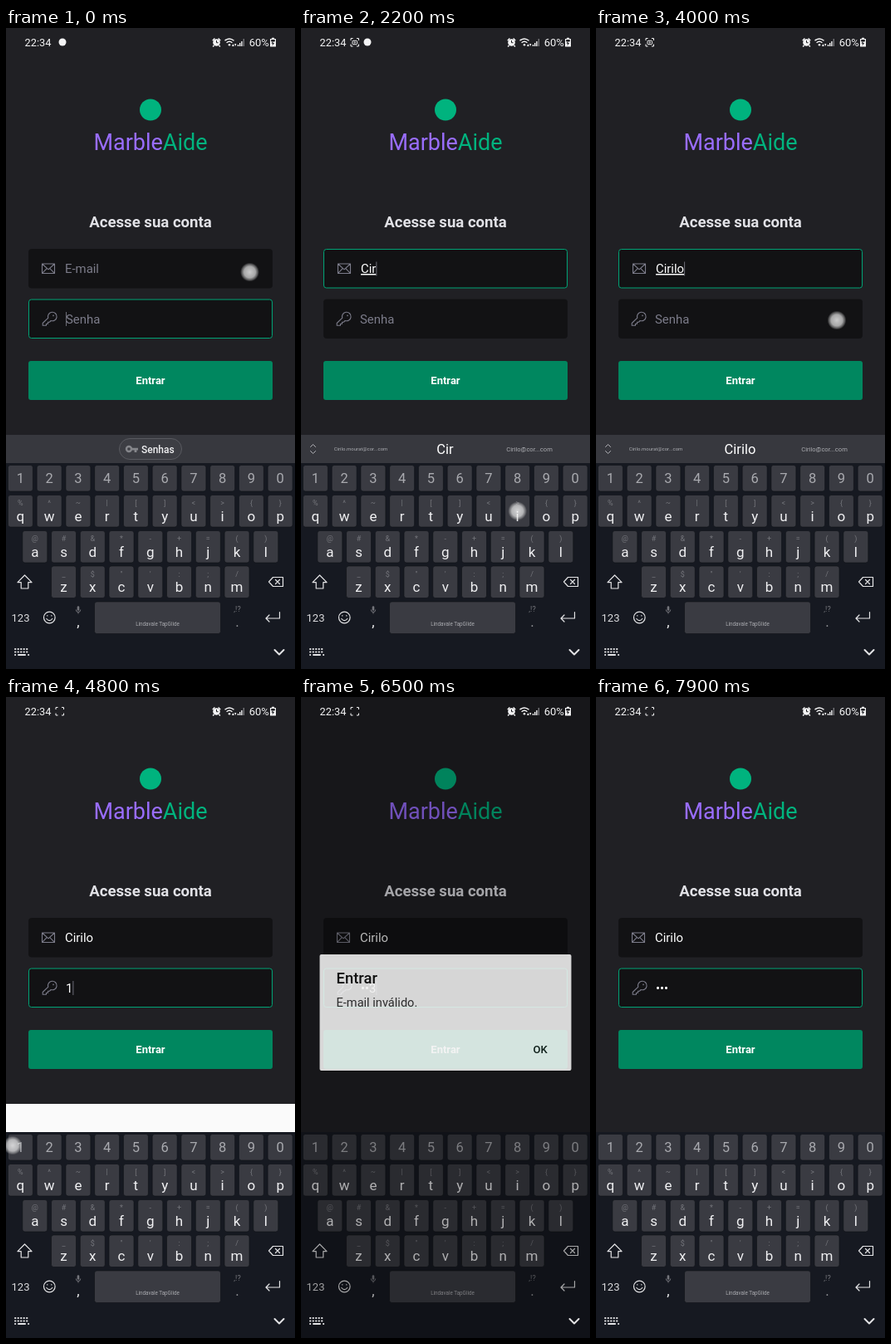
An HTML page for the animation above (8000 ms loop, 348 by 772 pixels).

```html
<!DOCTYPE html>
<html lang="pt-BR">
<head>
<meta charset="utf-8">
<title>Acesse sua conta</title>
<style>
  html, body { margin: 0; width: 100%; height: 100%; overflow: hidden; background: #202024; }
  svg { display: block; width: 100%; height: 100%; font-family: Roboto, sans-serif; }
  .mid { text-anchor: middle; }
  .bold { font-weight: 700; }
  .line { fill: none; stroke: #e4e4e6; stroke-width: 1.2; stroke-linecap: round; stroke-linejoin: round; }
  .icon { fill: none; stroke: #7c7c8a; stroke-width: 1.1; stroke-linejoin: round; stroke-linecap: round; }
  .field rect { fill: #121214; stroke: #121214; }
  .field.focus rect { stroke: #00a375; }
  .field.focus .inner { transform: translateX(1px); }
  .value { font-size: 14.9px; fill: #fff; }
  .value.empty { fill: #7c7c8a; }
  .value.composing { text-decoration: underline; }
  .key { fill: #3a3b42; stroke: #0f1117; stroke-width: .6; }
  .hint { font-size: 9px; fill: #74757b; text-anchor: middle; }
  .letter { font-size: 17px; fill: #f0f0f2; text-anchor: middle; }
  .digit { font-size: 16.5px; fill: #a9aaaf; text-anchor: middle; }

  #enter { fill: #00875f; animation: press 8s step-end infinite; }
  #flash { opacity: 0; animation: flash 8s step-end infinite; }
  #dim { opacity: 0; animation: dim 8s linear infinite; }
  #dialog { opacity: 0; animation: dialog 8s linear infinite; }
  @keyframes press { 0%, 76.5% { fill: #00875f; } 73.5% { fill: #00b37e; } }
  @keyframes flash { 0%, 66.25% { opacity: 0; } 53.75% { opacity: 1; } }
  @keyframes dim {
    0%, 78.5%, 98%, 100% { opacity: 0; }
    81.25% { opacity: .27; }
    82.5%, 95% { opacity: .32; }
  }
  @keyframes dialog {
    0%, 79.4%, 97.5%, 100% { opacity: 0; }
    81.25% { opacity: .83; }
    82.5%, 95% { opacity: 1; }
  }
</style>
</head>
<body>
<svg viewBox="0 0 348 772" preserveAspectRatio="none">
  <defs>
    <radialGradient id="glow">
      <stop offset="0" stop-color="#fff" stop-opacity=".78"/>
      <stop offset=".6" stop-color="#eee" stop-opacity=".68"/>
      <stop offset=".82" stop-color="#ccc" stop-opacity=".4"/>
      <stop offset="1" stop-color="#aaa" stop-opacity="0"/>
    </radialGradient>
  </defs>
  <rect width="348" height="772" fill="#202024"/>

  <!-- Brand and heading -->
  <circle cx="174" cy="98.5" r="13" fill="#00b37e"/>
  <text class="mid" x="174" y="147" font-size="27" fill="#996dff">Marble<tspan fill="#00b37e">Aide</tspan></text>
  <text class="mid bold" x="174" y="240" font-size="18.6" fill="#e1e1e6">Acesse sua conta</text>

  <!-- Form -->
  <g class="field" id="email">
    <rect x="27.5" y="266.5" width="293" height="46.5" rx="3"/>
    <g class="inner">
      <path class="icon" d="M43.5 284h15v11.5h-15zl7.5 6.8 7.5-6.8M43.8 295.2l5.4-5.6M58.2 295.2l-5.4-5.6"/>
      <text class="value" x="71" y="295"></text>
    </g>
  </g>
  <g class="field" id="password">
    <rect x="27.5" y="327" width="293" height="46.5" rx="3"/>
    <g class="inner">
      <path class="icon" d="M49.8 349.2a5.3 5.3 0 1 1 3.3 3.3l-1.6 1.7h-2v2h-2v2h-4.3v-2.7z"/>
      <circle cx="56" cy="346.4" r=".8" fill="#7c7c8a"/>
      <text class="value" x="71" y="356"></text>
    </g>
  </g>
  <rect id="caret" width="1" height="17" fill="#6c6c76"/>
  <rect id="enter" x="27" y="401" width="294" height="47" rx="3"/>
  <text class="mid bold" x="174" y="429" font-size="13" fill="#fff">Entrar</text>

  <!-- Suggestion strip -->
  <g id="strip">
    <rect y="490" width="348" height="34" fill="#37383e"/>
    <g id="pill">
      <rect x="136.5" y="494.5" width="75" height="25" rx="12.5" fill="#3d3e44" stroke="#595a60"/>
      <path d="M151.5 505.7h7.5v2.8h-1.6v2.6h-2.8v-2.6h-3.1z" fill="#85868b"/>
      <circle cx="148" cy="507" r="3" fill="none" stroke="#85868b" stroke-width="2.4"/>
      <text x="163" y="512" font-size="12" font-weight="500" fill="#f0f0f2">Senhas</text>
    </g>
    <g id="words">
      <path class="line" d="M11.5 504.5l3-3 3 3M11.5 509.5l3 3 3-3" style="stroke:#b5b5ba;stroke-width:1"/>
      <text class="mid" x="72" fill="#aaabb0"></text>
      <text class="mid" x="173.5" fill="#fff"></text>
      <text class="mid" x="275" fill="#aaabb0"></text>
    </g>
  </g>
  <rect id="flash" y="490" width="348" height="34" fill="#fafafa"/>

  <!-- Keyboard -->
  <rect y="524" width="348" height="248" fill="#161921"/>
  <g id="keys"></g>
  <rect class="key" x="106.5" y="691" width="152" height="38.5" rx="3"/>
  <text class="mid" x="182.5" y="719.5" font-size="6.3" fill="#aaabb0">Lindavale TapGlide</text>
  <text class="mid" x="17.5" y="714.5" font-size="13" fill="#dcdcdf">123</text>
  <text class="mid" x="87" y="721" font-size="17" fill="#f0f0f2">,</text>
  <text class="mid" x="278.5" y="721" font-size="17" fill="#9a9ba0">.</text>
  <text class="hint" x="278.5" y="703">,!?</text>
  <g class="line">
    <path d="M22.5 659l8.5 8.7h-4.2v7.3h-8.6v-7.3H14z"/>
    <path d="M316.5 667l5-5.5h12v11h-12zM324.5 664.5l5 5M329.5 664.5l-5 5"/>
    <circle cx="52.3" cy="710" r="6.8"/>
    <path d="M48.8 711.5q3.5 4.4 7 0M49.8 707.6v.4M54.8 707.6v.4"/>
    <path d="M329.5 703.5v7.5h-16M317 707l-4 4 4 4"/>
  </g>
  <g fill="none" stroke="#74757b">
    <path d="M84.3 700.5q0 3 2.7 3t2.7-3M87 703.5v2"/>
    <path d="M87 697.5v3" stroke-width="2.6" stroke-linecap="round"/>
  </g>

  <rect id="dim" width="348" height="772"/>

  <!-- Bottom bar icons -->
  <g class="line">
    <path d="M323.5 749l5.5 5.5 5.5-5.5" style="stroke-width:2"/>
    <path d="M11 748h16M11 751.5h16" style="stroke-width:2;stroke-dasharray:.4 3.1"/>
    <path d="M11 755h.2M15 755h8M27 755h.2" style="stroke-width:2"/>
  </g>

  <!-- Status bar -->
  <g fill="#f4f4f5">
    <text x="22.5" y="21.6" font-size="12.8">22:34</text>
    <text x="292.7" y="21.6" font-size="13">60%</text>
    <circle id="app" cx="68" cy="17" r="4.5"/>
    <circle cx="253.5" cy="17.5" r="4.3"/>
    <path d="M248.8 15.3l2.6-2.8M258.2 15.3l-2.6-2.8M250.5 21l-1.4 1.5M256.5 21l1.4 1.5" stroke="#f4f4f5" stroke-width="1.5"/>
    <path d="M253.5 15v2.7h2" fill="none" stroke="#202024"/>
    <path d="M263.5 15.3q5.5-4.8 11 0M265.6 17.7q3.4-2.9 6.8 0" fill="none" stroke="#f4f4f5" stroke-width="1.4"/>
    <circle cx="269" cy="20.2" r="1.3"/>
    <path d="M272 22l1.4-3 1.4 3zM275 19l1.2 3 1.2-3z"/>
    <path d="M279.5 22v-2M281.7 22v-4M283.9 22v-6" stroke="#f4f4f5" stroke-width="1.4"/>
    <path d="M286.3 22v-9" stroke="#77777b" stroke-width="1.4"/>
    <path d="M320 11.8h3v1.2h2v9.5h-7v-9.5h2z"/>
    <path d="M319.2 14h4.6v2.5h-4.6z" fill="#202024"/>
    <path d="M321.5 15.5l-2 3.2h1.6l-.6 2.8 2.7-3.6h-1.7z" fill="#202024"/>
  </g>
  <g id="scan" fill="none" stroke="#f4f4f5">
    <path d="M60 15v-2.5h2.5M67 12.5h2.5V15M69.5 19.5V22H67M62.5 22H60v-2.5"/>
    <g id="scanCore"><rect x="62" y="15.3" width="5.6" height="4.4" rx="1"/><circle cx="64.8" cy="17.5" r=".7"/></g>
  </g>

  <!-- Alert -->
  <g id="dialog">
    <rect x="22" y="311.5" width="304" height="140" rx="3" fill="#000" opacity=".3"/>
    <rect x="22.5" y="310" width="303" height="140" rx="2" fill="#fff"/>
    <g fill="#111">
      <text x="42.5" y="345" font-size="18.4" font-weight="500">Entrar</text>
      <text x="42.5" y="373" font-size="14.6" fill="#333">E-mail inválido.</text>
      <text x="279.5" y="429" font-size="13" font-weight="500">OK</text>
    </g>
  </g>
  <circle id="touch" r="11.5" fill="url(#glow)"/>
</svg>
<script>
const LOOP = 8000, PITCH = 34.75;
const $ = id => document.getElementById(id);
const show = (el, on) => { el.style.visibility = on ? 'visible' : 'hidden'; };

function add(name, attrs, text = '') {
  const el = document.createElementNS('http://www.w3.org/2000/svg', name);
  for (const k in attrs) el.setAttribute(k, attrs[k]);
  el.textContent = text;
  return $('keys').appendChild(el);
}

// Keyboard rows: characters, hints, first key centre, top edge
const rows = [
  ['1234567890', '', 17.4, 526.5],
  ['qwertyuiop', '%^~|[]<>{}', 17.4, 562.5],
  ['asdfghjkl', '@#&*-+=()', 34.8, 605.5],
  ['zxcvbnm', '_$"\':;/', 69.5, 648]
];
const letters = [], spot = {};
for (const [chars, hints, x0, y] of rows) {
  [...chars].forEach((c, i) => {
    const x = x0 + i * PITCH, h = hints ? 38.5 : 31.5;
    spot[c] = [x, y + h / 2];
    add('rect', { class: 'key', x: x - 15, y, width: 30, height: h, rx: 3 });
    if (!hints) return add('text', { class: 'digit', x, y: y + 21.5 }, c);
    add('text', { class: 'hint', x, y: y + 12.5 }, hints[i]);
    letters.push(add('text', { class: 'letter', x, y: y + 31 }, c));
  });
}

// Typing and touch schedule
const NAME = 'Cirilo';
const nameTimes = [1750, 1920, 2090, 2260, 2430, 2650];
const codeTimes = [4720, 5000, 5300];
const EMAIL_FOCUS = 150, PASS_FOCUS = 4150, MASKED = 6580;
const CAPS_ON = 350, CAPS_OFF = 1790;
const touches = [
  [293.5, 294, -100, 150],
  ...nameTimes.map((at, i) => [...spot[NAME[i].toLowerCase()], at - 60, at + 50]),
  [290, 352, 3980, 4150],
  [8, 540, 4680, 4850],
  [51, 541, 4970, 5100],
  [86, 541, 5270, 5400],
  [273.5, 442, 5880, 6080],
  [288, 425, 7480, 7600]
];
const edits = [-100, EMAIL_FOCUS, ...nameTimes, PASS_FOCUS, ...codeTimes];
const countBy = (times, t) => times.filter(at => at <= t).length;

function drawField(id, text, hint, focus, composing) {
  const field = $(id), value = field.querySelector('.value');
  field.classList.toggle('focus', focus);
  value.classList.toggle('empty', !text);
  value.classList.toggle('composing', composing);
  value.textContent = text || hint;
  if (!focus) return;
  $('caret').setAttribute('x', 72 + (text ? value.getComputedTextLength() : 0));
  $('caret').setAttribute('y', id === 'email' ? 281.5 : 342);
}

function suggestions(typed) {
  if (!typed) return [['Eu', 16], ['E', 16], ['Não', 16]];
  if (typed.length < 3) return [['Com', 16], [typed, 16.5], ['Casa', 16]];
  return [[NAME + '.mourat@cor...com', 6], [typed, 16.5], [NAME + '@cor...com', 7.6]];
}

function drawStrip(t, typed) {
  show($('strip'), t < 4300);
  const pill = t < CAPS_ON;
  $('pill').style.display = pill ? '' : 'none';
  $('words').style.display = pill ? 'none' : '';
  const texts = $('words').querySelectorAll('text');
  suggestions(typed).forEach(([word, size], i) => {
    texts[i].textContent = word;
    texts[i].setAttribute('font-size', size);
    texts[i].setAttribute('y', 507 + size * .36);
  });
}

function drawTouch(t) {
  const hit = touches.filter(p => p[2] <= t).pop();
  const [x, y, , end] = hit;
  $('touch').setAttribute('cx', x);
  $('touch').setAttribute('cy', y);
  $('touch').style.opacity = Math.max(0, 1 - Math.max(0, t - end) / 120);
}

function draw(t) {
  const typed = NAME.slice(0, countBy(nameTimes, t));
  const n = countBy(codeTimes, t);
  const code = t >= MASKED ? '•••' : n ? '•'.repeat(n - 1) + n : '';
  const onEmail = t >= EMAIL_FOCUS && t < PASS_FOCUS;
  drawField('email', typed, 'E-mail', onEmail, onEmail && typed !== '');
  drawField('password', code, 'Senha', !onEmail, false);

  const lastEdit = edits.filter(at => at <= t).pop();
  show($('caret'), (t - lastEdit) % 1000 < 500);

  const caps = t >= CAPS_ON && t < CAPS_OFF;
  for (const el of letters) {
    const c = el.textContent;
    el.textContent = caps ? c.toUpperCase() : c.toLowerCase();
  }
  drawStrip(t, typed);

  const scanning = t >= 500;
  show($('scan'), scanning);
  show($('scanCore'), scanning && (t + 30) % 1000 < 500);
  $('app').setAttribute('cx', scanning ? 80 : 68);
  show($('app'), t < 3700);
  drawTouch(t);
}

let start;
function tick(now) {
  start ??= now;
  draw((now - start) % LOOP);
  requestAnimationFrame(tick);
}
draw(0);
requestAnimationFrame(tick);
</script>
</body>
</html>
```
